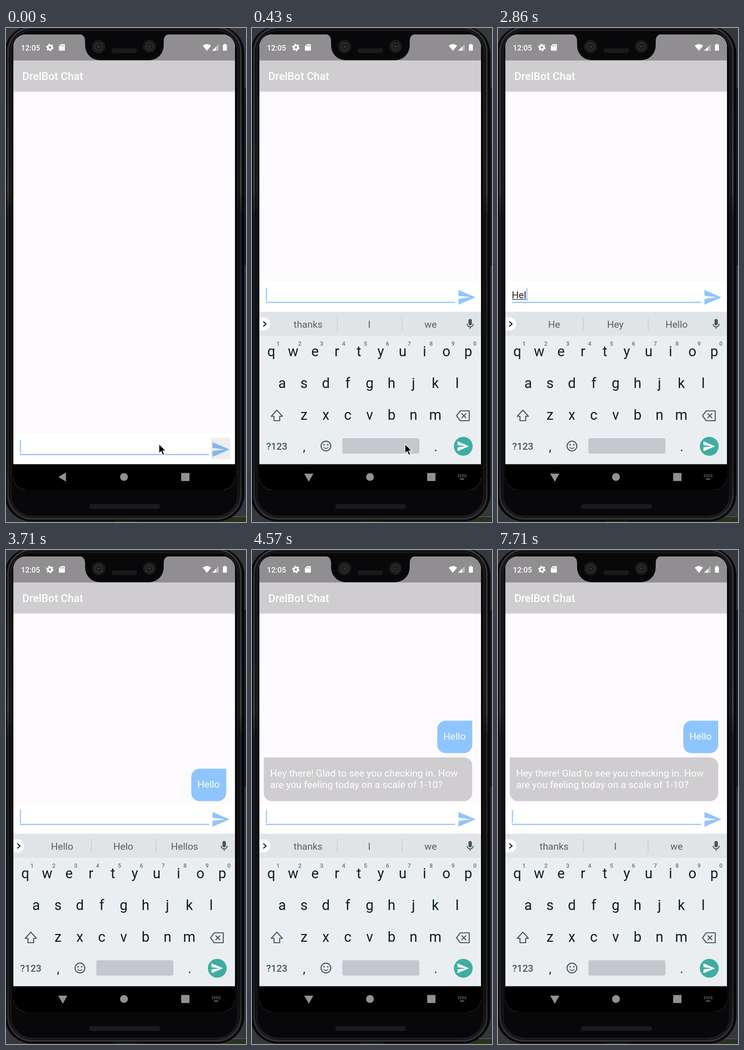
Animation of 522x1073 px, one loop 8 s. Source, as an HTML page:

```html
<!DOCTYPE html>
<html lang="en">
<head>
<meta charset="utf-8">
<title>Chat</title>
<style>
html, body { margin: 0; width: 100%; height: 100%; overflow: hidden; background: #35373b; }
svg { display: block; width: 522px; height: 1073px; font-family: Roboto, "Noto Sans", sans-serif; }
.mid { text-anchor: middle; }
.msg { font-size: 21.06px; fill: #fff; }
</style>
</head>
<body>
<svg viewBox="0 0 522 1073" xmlns="http://www.w3.org/2000/svg">
  <defs>
    <clipPath id="screen"><rect x="16" y="14" width="482" height="989" rx="27"/></clipPath>
    <clipPath id="app"><rect x="16" y="14" width="482" height="933.5"/></clipPath>
    <linearGradient id="edge" x2="0" y2="1">
      <stop offset="0" stop-color="#4a4a4e"/>
      <stop offset=".08" stop-color="#3f3f43"/>
      <stop offset=".33" stop-color="#55555a"/>
      <stop offset=".38" stop-color="#2b2b2e"/>
      <stop offset=".9" stop-color="#2b2b2e"/>
      <stop offset="1" stop-color="#47474b"/>
    </linearGradient>
    <filter id="soft" filterUnits="userSpaceOnUse" x="-20" y="-20" width="562" height="1113"><feGaussianBlur stdDeviation=".8"/></filter>
    <linearGradient id="shade" x2="0" y2="1">
      <stop offset="0" stop-color="#cac8cb"/>
      <stop offset="1" stop-color="#fcfafd"/>
    </linearGradient>
    <radialGradient id="lens">
      <stop offset="0" stop-color="#4b4b48"/>
      <stop offset=".25" stop-color="#161616"/>
      <stop offset=".6" stop-color="#2c2c2a"/>
      <stop offset=".8" stop-color="#151515"/>
      <stop offset="1" stop-color="#262625"/>
    </radialGradient>
    <pattern id="mesh" width="3" height="3" patternUnits="userSpaceOnUse">
      <rect width="3" height="3" fill="#141415"/><rect width="1.5" height="1.5" fill="#2b2b2c"/>
    </pattern>
    <path id="plane" d="M2 21 23 12 2 3v7l15 2-15 2z"/>
  </defs>

  <!-- desktop and phone body -->
  <rect width="522" height="1073" fill="#35373b"/>
  <path d="M519 130h3v385h-3z" fill="#17191d"/>
  <rect x="470" y="1062" width="52" height="11" fill="#28331f"/>
  <path d="M470 1061.5h52" stroke="#68696b"/>
  <rect x="-3.5" y="-5" width="522" height="1077" rx="60" fill="#08070a"/>
  <g fill="none" stroke="url(#edge)" filter="url(#soft)">
    <rect x="4.5" y="-1" width="506" height="1067" rx="53" stroke-width="3"/>
    <rect x="10.5" y="5" width="494" height="1056" rx="46" stroke-width="1.2"/>
  </g>
  <rect x="235" y="1071" width="50" height="2" fill="#28331f"/>
  <rect x="14" y="10" width="486" height="1046" rx="40" fill="#08070a"/>
  <rect x="181" y="1034" width="154" height="10.5" rx="5" fill="#1b1b1d"/>

  <g clip-path="url(#screen)">
    <rect x="16" y="14" width="483" height="990" fill="#fcfafd"/>
    <rect x="16" y="136" width="483" height="4" fill="url(#shade)"/>
    <rect x="16" y="70" width="483" height="66" fill="#cfcdd0"/>
    <rect x="16" y="14" width="483" height="56.5" fill="#908e90"/>
    <text x="35.5" y="112.5" font-size="23.4" font-weight="500" fill="#fff">DrelBot Chat</text>

    <!-- status icons -->
    <g fill="#fff">
      <text x="32.5" y="48.5" font-size="16.4" font-weight="500">12:05</text>
      <circle cx="95.5" cy="42.3" r="4.4" fill="none" stroke="#fff" stroke-width="3.6"/>
      <circle cx="95.5" cy="42.3" r="6.7" fill="none" stroke="#fff" stroke-width="2.8" stroke-dasharray="3.5 3.516"/>
      <path d="M119.5 35h7.2q1.3 0 1.3 1.4v11.4q0 1.4-1.3 1.4h-10.4q-1.3 0-1.3-1.4v-8.3z"/>
      <path d="M119.4 37.2v3M122.3 37.2v3M125.2 37.2v3" stroke="#908e90" stroke-width="1.3"/>
      <path d="M427.8 38.3Q437 31.3 446.2 38.3L437 49.5z"/>
      <path d="M462.5 35v14.2h-14.2z" opacity=".4"/>
      <path d="M457 40.5v8.7h-8.7z"/>
      <path d="M474.3 34.6h3.6v1.5h1.6q.9 0 .9.9v11.2q0 1-.9 1h-6.8q-.9 0-.9-1V37q0-.9.9-.9h1.6z"/>
    </g>

    <g clip-path="url(#app)">
      <g id="hello">
        <path d="M421 475h58v52.5a18 18 0 0 1-18 18h-40a18 18 0 0 1-18-18V493a18 18 0 0 1 18-18z" fill="#8fc5ff"/>
        <text class="msg" x="416.3" y="516.2">Hello</text>
      </g>
      <g id="reply">
        <path d="M25.5 450.5H461a18 18 0 0 1 18 18v59a18 18 0 0 1-18 18H43.5a18 18 0 0 1-18-18z" fill="#cfcdd0"/>
        <text class="msg" x="39.5" y="492">Hey there! Glad to see you checking in. How</text>
        <text class="msg" x="39.5" y="516.5">are you feeling today on a scale of 1-10?</text>
      </g>

      <g id="bar">
        <rect x="16" y="550" width="483" height="67" fill="#fff"/>
        <rect id="ripple" x="446" y="559.5" width="42" height="46.5" fill="#eeedef"/>
        <use id="send" href="#plane" transform="translate(445.5 563.8) scale(1.77)"/>
        <path d="M30 596h411.5" stroke="#8fc5ff" stroke-width="2.3"/>
        <text id="typed" x="30" y="586.5" font-size="21.06" fill="#1f1f20"></text>
        <path id="rule" stroke="#1f1f20" stroke-width="1.2"/>
        <path id="caret" stroke="#8fc5ff" stroke-width="2.3"/>
      </g>

      <g id="keyboard">
        <rect x="16" y="616.5" width="483" height="331" fill="#eaeef1"/>
        <rect x="16" y="616.5" width="483" height="52" fill="#e0e4e7"/>
        <path d="M16 628.5h9.5a14.2 14.2 0 0 1 0 28.4H16z" fill="#fff"/>
        <path d="M24.5 637.5l6 5.3-6 5.3" fill="none" stroke="#15242c" stroke-width="2.3"/>
        <path d="M185.5 629v28M326.5 629v28" stroke="#bfc5c8" stroke-width="1.2"/>
        <g id="hints" class="mid" font-size="21" fill="#545f65"></g>
        <g fill="#45545c" stroke="#45545c">
          <rect x="470.8" y="632" width="7.4" height="13.8" rx="3.7" stroke="none"/>
          <path d="M467.8 642.5a6.7 6.7 0 0 0 13.4 0M474.5 649v4.5" fill="none" stroke-width="2"/>
        </g>
        <g id="keys" class="mid"></g>
        <g fill="none" stroke="#45545c" stroke-width="2.2">
          <path d="M54 830L41.8 843.5h6v9.5h12.4v-9.5h6z" stroke-linejoin="round"/>
          <path d="M453 831.5h19.5v21.5H453l-8.2-10.7zM455.8 837.3l10 10M465.8 837.3l-10 10" stroke-linejoin="round"/>
          <circle cx="160.8" cy="908" r="10.6"/>
        </g>
        <g fill="#45545c" transform="translate(147.2 894.4) scale(1.13)">
          <circle cx="8.5" cy="9.5" r="1.5"/>
          <circle cx="15.5" cy="9.5" r="1.5"/>
          <path d="M12 16c-1.48 0-2.75-.81-3.45-2H6.88c.8 2.05 2.79 3.5 5.12 3.5s4.32-1.45 5.12-3.5h-1.67c-.69 1.19-1.97 2-3.45 2z"/>
        </g>
        <rect x="196.5" y="891" width="167.5" height="33.5" rx="4" fill="#c4c8cd"/>
        <circle cx="459.5" cy="908.5" r="20.5" fill="#3fada2"/>
        <use href="#plane" transform="translate(444.5 894.1) scale(1.2)" fill="#fff"/>
      </g>
    </g>

    <!-- navigation bar -->
    <rect x="16" y="947.5" width="483" height="57"/>
    <g fill="#929093">
      <path id="back"/>
      <circle cx="256.6" cy="975.3" r="8.5"/>
      <rect x="381" y="966.5" width="18" height="17.5" rx="1"/>
      <g id="imeIcon" stroke="#929093" stroke-width="1.8">
        <path d="M448 971h18M448 974.7h18" stroke-dasharray="2.1 1.85"/>
        <path d="M452.5 979.7h9"/>
      </g>
    </g>
  </g>

  <!-- notch -->
  <path d="M158 13C168 14 172 19 172 29v9a32 32 0 0 0 32 32H311a32 32 0 0 0 32-32V29C343 19 347 14 357 13z" fill="#08070a"/>
  <circle cx="201.5" cy="40.5" r="14" fill="url(#lens)"/>
  <circle cx="312" cy="40" r="13.5" fill="url(#lens)"/>
  <rect x="230" y="44" width="55" height="10.5" rx="5" fill="url(#mesh)"/>

  <path id="pointer" d="M332.8 903.5v20.5l4.7-4.4 3.3 8 3.6-1.5-3.4-7.7h6.3z" fill="#000" stroke="#fff" stroke-width="1.3"/>
</svg>
<script>
const LOOP = 8000, PITCH = 47.6;
const el = Object.fromEntries([...document.querySelectorAll("[id]")].map(e => [e.id, e]));
const label = (x, y, s, attrs = "") => `<text x="${x}" y="${y}" ${attrs}>${s}</text>`;
const show = (e, on) => e.setAttribute("visibility", on ? "visible" : "hidden");
const shift = (e, y) => e.setAttribute("transform", `translate(0 ${y})`);

// Latest value of a list of [start time, value] steps.
const at = (steps, t) => steps.reduce((v, [start, next]) => t >= start ? next : v, steps[0][1]);

const keyRow = (letters, x, y) => [...letters].map((c, i) =>
  label(x + i * PITCH, y, c, 'font-size="30.6" fill="#0d1d26"')).join("");

el.keys.innerHTML =
  keyRow("qwertyuiop", 42, 712.5) + keyRow("asdfghjkl", 65.5, 781.5) + keyRow("zxcvbnm", 113.1, 850.5) +
  [..."1234567890"].map((c, i) =>
    label(56.5 + i * PITCH, 690, c, 'font-size="12.6" font-weight="500" fill="#66727a"')).join("") +
  label(54, 916, "?123", 'font-size="21" font-weight="500" fill="#45545c"') +
  label(113.5, 919, ",", 'font-size="27" fill="#0d1d26"') +
  label(399.5, 919, ".", 'font-size="27" fill="#0d1d26"');

const TYPING = [[0, ""], [2570, "H"], [2710, "He"], [2860, "Hel"], [3000, "Hell"], [3140, "Hello"], [3430, ""]];
const IDLE = "thanks I we";
const HINTS = [[0, IDLE], [2710, "He Hey Hello"], [3140, "Hello Helo Hellos"], [3860, IDLE]];
const CARET = [[0, 1], [570, 0], [1000, 1], [1570, 0], [2000, 1], [4000, 0], [4570, 1], [5000, 0],
  [5570, 1], [6000, 0], [6570, 1], [7000, 0], [7570, 1]];
const SLIDE = [[0, 331], [140, 95], [290, 0]];
const HELLO_FADE = [[0, 0], [3430, 0.5], [3570, 1]];

let lastTyped, lastHints, textWidth = 0;

function draw(t) {
  const open = t >= 140, replied = t >= 4570;
  shift(el.bar, open ? 0 : 330.5);
  shift(el.keyboard, at(SLIDE, t));
  show(el.keyboard, open);
  show(el.imeIcon, open);
  show(el.ripple, !open);
  el.send.setAttribute("fill", open ? "#8fc5ff" : "#82b7ee");
  el.back.setAttribute("d", open ? "M113.5 968h20l-10 17.5z" : "M114 975.3l16.5-10v20z");
  show(el.pointer, t < 2290);

  const typed = at(TYPING, t);
  if (typed !== lastTyped) {
    el.typed.textContent = lastTyped = typed;
    textWidth = typed ? el.typed.getComputedTextLength() : 0;
    el.rule.setAttribute("d", typed ? `M30 589.3h${textWidth}` : "");
    el.caret.setAttribute("d", `M${31.4 + textWidth} 564.5v28.5`);
  }
  show(el.caret, at(CARET, t));

  const hints = at(HINTS, t);
  if (hints !== lastHints) {
    lastHints = hints;
    el.hints.innerHTML = hints.split(" ").map((s, i) => label(122 + i * 133.2, 651, s)).join("");
  }

  el.hello.setAttribute("opacity", at(HELLO_FADE, t));
  shift(el.hello, replied ? -104.3 : 0);
  show(el.reply, replied);
}

const start = performance.now();
function tick() {
  draw((performance.now() - start) % LOOP);
  requestAnimationFrame(tick);
}
tick();
</script>
</body>
</html>
```
